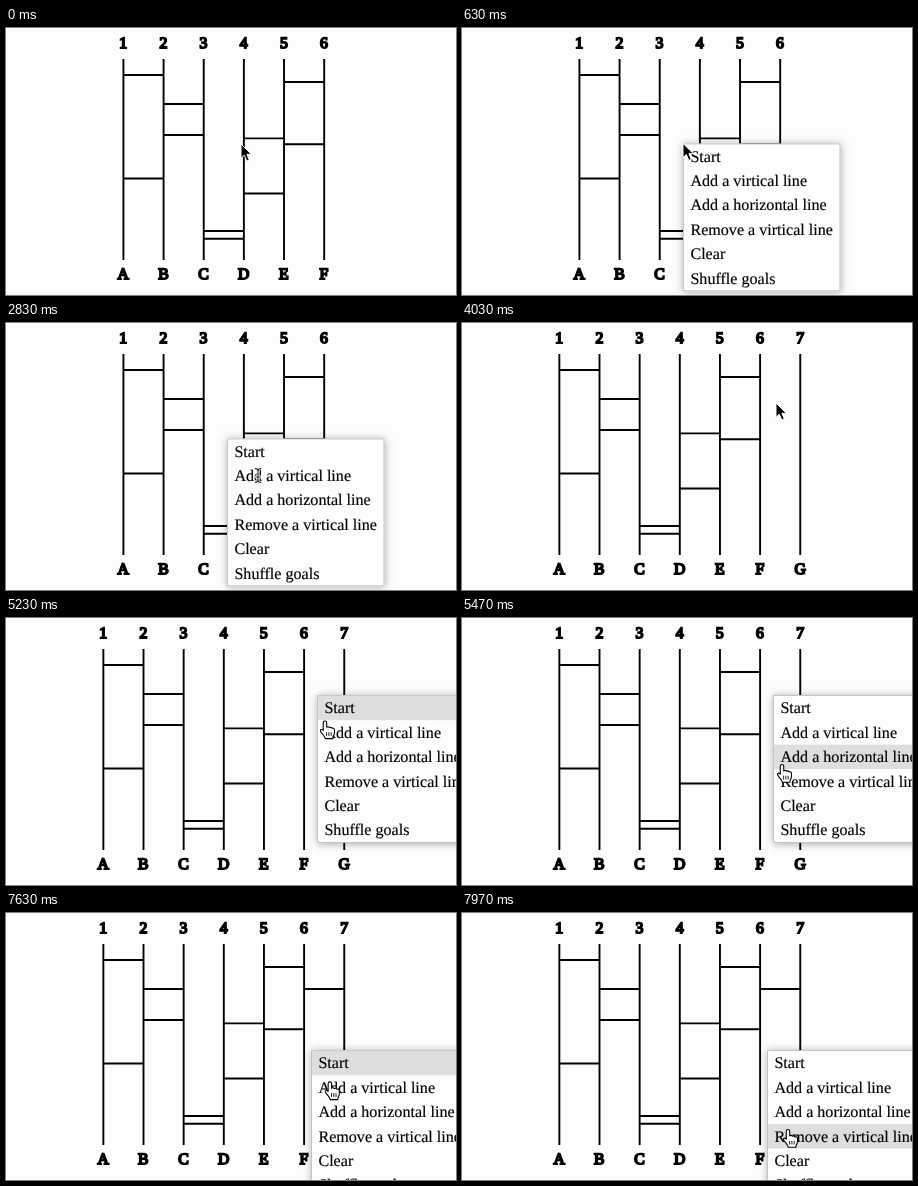
Animation of 450x267 px, one loop 8 s. Source, as an HTML page:

```html
<!DOCTYPE html>
<html lang="en">
<head>
<meta charset="utf-8">
<title>Ladder lottery</title>
<style>
  html, body { margin: 0; width: 100%; height: 100%; overflow: hidden; background: #fdfcfe; }
  svg { display: block; width: 450px; height: 267px; overflow: hidden; }
  text { font-family: "Liberation Serif", "Times New Roman", serif; text-rendering: geometricPrecision; stroke: #000; }
  .label { font-size: 15.7px; text-anchor: middle; stroke-width: 1.8; }
  .item { font-size: 16.1px; stroke-width: .15; }
  .line { stroke: #000; stroke-width: 1.9; fill: none; }
</style>
</head>
<body>
<svg viewBox="0 0 450 267">
  <defs>
    <filter id="shadow" x="-15%" y="-15%" width="130%" height="130%">
      <feDropShadow dx=".5" dy="1" stdDeviation="4" flood-color="#000" flood-opacity=".32"/>
    </filter>
    <path id="beamShape" d="M-2.8-6.8Q0-6.8 0-4.5Q0-6.8 2.8-6.8M0-4.5V4.5M-2.2 1.5H2.2M-2.8 6.8Q0 6.8 0 4.5Q0 6.8 2.8 6.8"/>
  </defs>
  <g id="ladder"></g>
  <g id="menu">
    <rect x=".5" y=".5" width="156.5" height="147" fill="#fefdfe" stroke="#c4c3c5" filter="url(#shadow)"/>
    <rect id="highlight" x="1" width="155.5" height="24.4" fill="#dedede"/>
  </g>
  <g id="cursor">
    <path id="arrow" d="M0 0V14.2L3.3 11.2L5.8 17L8.3 16L5.9 10.3H10.4Z" fill="#000" stroke="#fff"/>
    <g id="hand" transform="scale(1.08)" fill="#fff" stroke="#000" stroke-linejoin="round">
      <path d="M-1.6 8.4V1.2a1.6 1.6 0 0 1 3.2 0V5.5q1.4-1.2 2.6.3q1.4-.9 2.4.6q2-.6 2.2 1.4V10.4q0 2-1.4 4v1.6H.4q-1-2.5-3.2-5q-2.4-2.8-.8-3.4q.9-.3 2 .8z"/>
      <path d="M1.5 10v3.5M3.6 10v3.5M5.7 10v3.5" stroke-width=".8"/>
    </g>
    <g id="beam" fill="none" stroke-linecap="round">
      <use href="#beamShape" stroke="#fff" stroke-width="2.8"/>
      <use href="#beamShape" stroke="#333" stroke-width="1.2"/>
    </g>
  </g>
</svg>
<script>
const LOOP = 8000, PITCH = 40.15, CENTER = 217.8, ROW = 24.4, HOVER_LAG = 60;
const ITEMS = ["Start", "Add a virtical line", "Add a horizontal line",
  "Remove a virtical line", "Clear", "Shuffle goals"];

// Heights of the two rungs in each gap between neighbouring lines.
const RUNGS = [[47, 150.5], [76, 107], [203, 210.8], [110.4, 165.5], [54, 116.3]];

// Each menu opens at the pointer; `leave` drops the hover before closing.
const MENUS = [
  { open: 600, hover: 1350, leave: 2830, close: 2870 },
  { open: 4300, hover: 5100, close: 6230 },
  { open: 7170, hover: 7430, close: LOOP }
];

const START = { x: 235, y: 116 };
const glide = (from, to, x, y) => ({ from, to, x, y });
const GLIDES = [
  glide(100, 230, 221, 115.4),
  glide(1050, 1620, 252, 152.5),
  glide(3500, 4030, 314, 80),
  glide(4030, 4200, 311, 77),
  glide(5060, 5470, 320, 147),
  glide(6630, 7080, 305, 137),
  glide(7400, 7930, 326, 217)
];

const $ = id => document.getElementById(id);
const show = (el, on) => el.setAttribute("display", on ? "inline" : "none");
const move = (el, { x, y }) => el.setAttribute("transform", `translate(${x} ${y})`);
const smooth = u => u * u * (3 - 2 * u);
const easeOut = u => 1 - (1 - u) ** 4;
const menuAt = t => MENUS.find(m => t >= m.open && t < m.close);

function add(parent, tag, attrs, text = "") {
  const el = document.createElementNS("http://www.w3.org/2000/svg", tag);
  for (const key in attrs) el.setAttribute(key, attrs[key]);
  el.textContent = text;
  parent.append(el);
  return el;
}

function buildLadder(count, rungs) {
  const group = add($("ladder"), "g", {});
  const lineX = i => CENTER + PITCH * (i - (count - 1) / 2);
  for (let i = 0; i < count; i++) {
    const x = lineX(i);
    add(group, "path", { class: "line", d: `M${x} 31V232` });
    add(group, "text", { class: "label", x: x - .2, y: 20 }, i + 1);
    add(group, "text", { class: "label", x: x - .2, y: 250.8 }, String.fromCharCode(65 + i));
  }
  rungs.forEach((heights, i) => heights.forEach(y =>
    add(group, "path", { class: "line", d: `M${lineX(i)} ${y}h${PITCH}` })));
  return group;
}

// A new line appears when the first menu closes, a new rung after the second.
const ladders = [buildLadder(6, RUNGS), buildLadder(7, RUNGS), buildLadder(7, [...RUNGS, [76]])];
ITEMS.forEach((label, i) =>
  add($("menu"), "text", { class: "item", x: 7.4, y: 18.3 + i * ROW }, label));

// Inside a menu the pointer swings in sideways first, then travels down.
function pointerAt(t) {
  let { x, y } = START;
  for (const g of GLIDES) {
    if (t < g.from) break;
    const u = Math.min(1, (t - g.from) / (g.to - g.from));
    x += (g.x - x) * (menuAt(g.from) ? easeOut : smooth)(u);
    y += (g.y - y) * smooth(u);
  }
  return { x, y };
}

function render(t) {
  const stage = MENUS.filter(m => t >= m.close).length;
  ladders.forEach((el, i) => show(el, i === stage));

  const menu = menuAt(t);
  const left = menu && t >= menu.leave;
  const hovering = menu && t >= menu.hover && !left;
  show($("menu"), menu);
  show($("highlight"), hovering);
  if (menu) {
    const corner = pointerAt(menu.open);
    const depth = pointerAt(t - HOVER_LAG).y - corner.y;
    move($("menu"), corner);
    $("highlight").setAttribute("y", .8 + Math.max(0, Math.floor(depth / ROW)) * ROW);
  }

  move($("cursor"), pointerAt(t));
  show($("hand"), hovering);
  show($("beam"), left);
  show($("arrow"), !hovering && !left);
}

function tick() {
  render(performance.now() % LOOP);
  requestAnimationFrame(tick);
}
tick();
</script>
</body>
</html>
```
